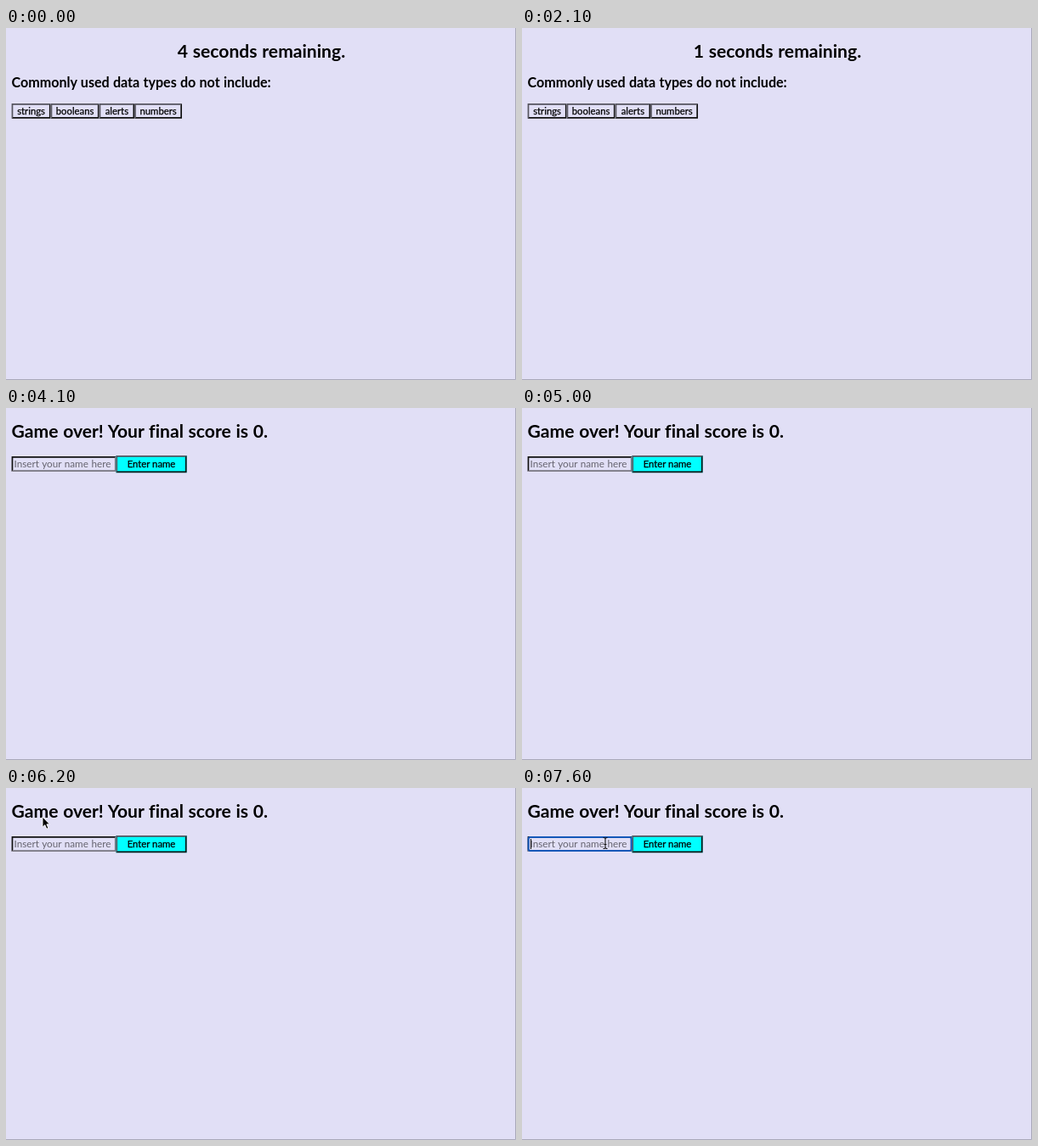
These frames come from a looping animation (600 by 415 pixels, 8 s). An HTML page:

```html
<!DOCTYPE html>
<html lang="en">
<head>
<meta charset="utf-8">
<title>Quiz timer</title>
<style>
html, body { margin: 0; height: 100%; overflow: hidden; background: #e1dff6; }
svg { display: block; width: 600px; height: 415px; }
text { font-family: Lato, "Open Sans", sans-serif; font-variant-ligatures: none; }
.head { font-weight: 700; font-size: 21.1px; word-spacing: .6px; }
.ask { font-weight: 700; font-size: 16.1px; word-spacing: .3px; }
.label { font-size: 11.3px; text-anchor: middle; stroke: #000; stroke-width: .25px; }
.hint { font-size: 11.7px; word-spacing: .6px; fill: #66646f; }
</style>
</head>
<body>
<svg viewBox="0 0 600 415">
  <g id="quiz">
    <text class="head" id="timer" x="300.5" y="34.5" text-anchor="middle"></text>
    <text class="ask" x="6.5" y="70.3">Commonly used data types do not include:</text>
  </g>
  <g id="over">
    <text class="head" x="6.5" y="34.5">Game over! Your final score is 0.</text>
    <g id="field"></g>
    <text class="hint" x="9.5" y="70">Insert your name here</text>
    <rect id="ring" x="7.6" y="58" width="121" height="16" rx="2" fill="none" stroke="#1457b8" stroke-width="2"/>
    <path id="caret" d="M10.5 60V72" stroke="#111" stroke-width="1"/>
  </g>
  <path id="arrow" d="M0 0V12.2L2.8 9.6L4.8 14.2L6.9 13.3L4.9 8.8H8.4Z" stroke="#fff" stroke-width=".9"/>
  <path id="beam" d="M-2.5 -6.5Q0 -6.5 0 -5Q0 -6.5 2.5 -6.5M0 -5.5V5.5M-2.5 6.5Q0 6.5 0 5Q0 6.5 2.5 6.5M-1.5 1.5H1.5" fill="none" stroke="#111" stroke-width="1.1"/>
  <path d="M599.5 0V414.5H0" fill="none" stroke="#a9a8ba"/>
</svg>
<script>
const $ = id => document.getElementById(id);
const show = (id, on) => $(id).style.display = on ? "" : "none";

// Rectangle with a two-tone raised or sunken border
function bevel(x, y, w, h, fill, light, dark) {
  const b = 1.7, r = x + w, d = y + h;
  return `<rect x="${x}" y="${y}" width="${w}" height="${h}" fill="${fill}"/>
    <path d="M${x} ${d}V${y}H${r}L${r - b} ${y + b}H${x + b}V${d - b}Z" fill="${light}"/>
    <path d="M${x} ${d}H${r}V${y}L${r - b} ${y + b}V${d - b}H${x + b}Z" fill="${dark}"/>`;
}

function button(x, y, w, h, label, fill) {
  return bevel(x, y, w, h, fill, "#55545e", "#111") +
    `<text class="label" x="${x + w / 2}" y="${y + h / 2 + 4}">${label}</text>`;
}

const page = "#e1dff6";
$("quiz").innerHTML += [[6.6, 46, "strings"], [52.6, 57, "booleans"], [109.6, 41.6, "alerts"], [151.2, 55.8, "numbers"]]
  .map(([x, w, label]) => button(x, 89, w, 17.8, label, page)).join("");
$("field").innerHTML = bevel(6.6, 57, 123, 18, page, "#111", "#77757f") +
  button(129.4, 56, 83.2, 20.2, "Enter name", "#0ff");

const ticks = [100, 1000, 2100, 3000];
const path = [[485, 402], [292, 262], [148, 133], [84, 80], [48, 46], [43, 34], [70, 54], [98, 65]];

function draw(now) {
  const t = now % 8000;
  $("timer").textContent = `${4 - ticks.filter(k => t >= k).length} seconds remaining.`;
  show("quiz", t < 4100);
  show("over", t >= 4100);

  const step = Math.min(Math.floor((t - 5700) / 100), path.length - 1);
  const [x, y] = path[Math.max(step, 0)];
  const inField = x > 7 && x < 129 && y > 57 && y < 75;
  show("arrow", step >= 0 && !inField);
  show("beam", step >= 0 && inField);
  for (const id of ["arrow", "beam"]) $(id).setAttribute("transform", `translate(${x} ${y})`);

  show("ring", t >= 6600);
  show("caret", t >= 6600 && (t - 6600) % 1000 < 500);
  requestAnimationFrame(draw);
}
requestAnimationFrame(draw);
</script>
</body>
</html>
```
